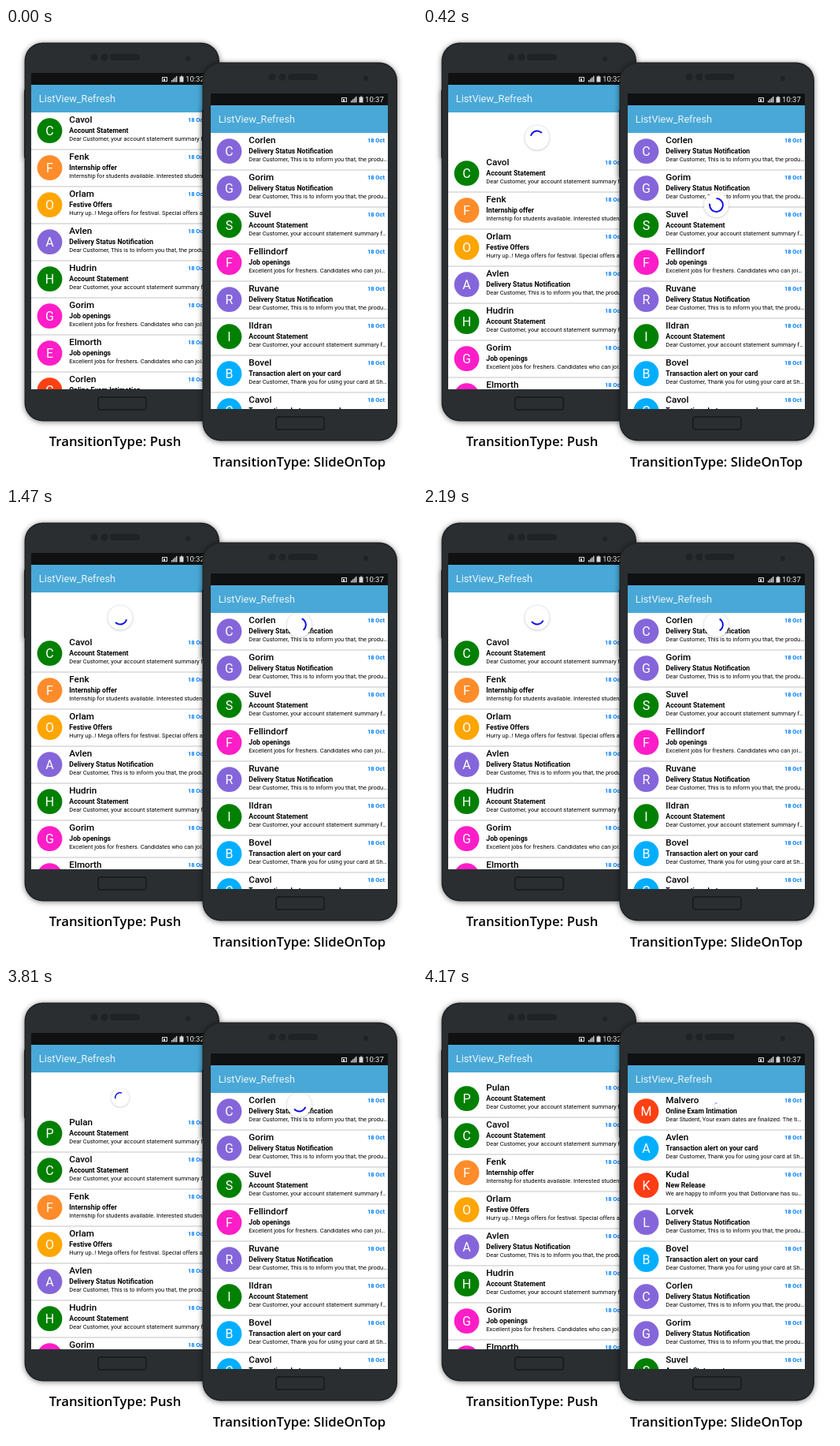
An HTML page with a canvas for the animation above (4200 ms loop, 522x573 px).

```html
<!DOCTYPE html>
<html lang="en">
<head>
<meta charset="utf-8">
<title>Pull to refresh transitions</title>
<style>
html, body { margin: 0; width: 100%; height: 100%; overflow: hidden; background: #fff; }
canvas { display: block; width: 522px; height: 573px; }
</style>
</head>
<body>
<canvas id="stage"></canvas>
<script>
const W = 522, H = 573, LOOP = 4200, STEP = 30, ROW = 47;
const canvas = document.getElementById('stage');
const ctx = canvas.getContext('2d');
const dpr = window.devicePixelRatio || 1;
canvas.width = W * dpr;
canvas.height = H * dpr;

// subject, preview, avatar colour
const MAILS = {
  account: ['Account Statement', 'Dear Customer, your account statement summary f…', '#008000'],
  intern: ['Internship offer', 'Internship for students available. Interested studen…', '#ff8c2a'],
  festive: ['Festive Offers', 'Hurry up..! Mega offers for festival. Special offers a…', '#ffa500'],
  delivery: ['Delivery Status Notification', 'Dear Customer, This is to inform you that, the produ…', '#8566da'],
  job: ['Job openings', 'Excellent jobs for freshers. Candidates who can joi…', '#ff1dc8'],
  exam: ['Online Exam Intimation', 'Dear Student, Your exam dates are finalized. The ti…', '#ff4012'],
  card: ['Transaction alert on your card', 'Dear Customer, Thank you for using your card at Sh…', '#00aeff'],
  release: ['New Release', 'We are happy to inform you that Datlorvane has su…', '#ff3c14']
};

const pushList = [
  ['Cavol', 'account'], ['Fenk', 'intern'], ['Orlam', 'festive'], ['Avlen', 'delivery'],
  ['Hudrin', 'account'], ['Gorim', 'job'], ['Elmorth', 'job'], ['Corlen', 'exam']
];
const pushNew = [['Pulan', 'account']];
const slideList = [
  ['Corlen', 'delivery'], ['Gorim', 'delivery'], ['Suvel', 'account'], ['Fellindorf', 'job'],
  ['Ruvane', 'delivery'], ['Ildran', 'account'], ['Bovel', 'card'], ['Cavol', 'card']
];
const slideNew = [
  ['Malvero', 'exam'], ['Avlen', 'card'], ['Kudal', 'release'], ['Lorvek', 'delivery'], ['Bovel', 'card']
];

// [time, value] keys, linear between them
const pushOffset = [[0, 0], [180, 110], [210, 110], [270, 79], [360, 54], [3945, 54], [4221, 0]];
const pushScale = [[3765, 1], [3945, 0]];
const pushSpin = [[360, -136], [750, 65], [2190, 805], [3240, 1385], [3810, 1670], [4200, 1865]];
const slideY = [[0, -18], [30, -16], [270, 49], [510, 117], [600, 117], [690, 50], [750, 20], [810, 15]];
const slideScale = [[4020, 1], [4220, 0]];
const slideSpin = [[810, -704], [2190, 0], [3240, 535], [3810, 800], [4200, 990]];

function at(keys, t) {
  if (t <= keys[0][0]) return keys[0][1];
  for (let i = 1; i < keys.length; i++) {
    const [t0, a] = keys[i - 1], [t1, b] = keys[i];
    if (t <= t1) return a + (b - a) * (t - t0) / (t1 - t0);
  }
  return keys[keys.length - 1][1];
}

function text(str, x, y, font, color, align = 'left') {
  ctx.font = font;
  ctx.fillStyle = color;
  ctx.textAlign = align;
  ctx.fillText(str, x, y);
}

const roboto = (size, weight = 400) => `${weight} ${size}px Roboto, sans-serif`;

function rect(x, y, w, h, color) {
  ctx.fillStyle = color;
  ctx.fillRect(x, y, w, h);
}

function pill(x, y, w, h, r, color) {
  ctx.beginPath();
  ctx.roundRect(x, y, w, h, r);
  ctx.fillStyle = color;
  ctx.fill();
}

function disc(x, y, r, color) {
  ctx.beginPath();
  ctx.arc(x, y, r, 0, Math.PI * 2);
  ctx.fillStyle = color;
  ctx.fill();
}

function shadow(color, blur, dy) {
  ctx.shadowColor = color;
  ctx.shadowBlur = blur * dpr;
  ctx.shadowOffsetY = dy * dpr;
}

function body(x, y) {
  ctx.save();
  shadow('rgba(0,0,0,.5)', 7, 1);
  pill(x - 1, y + 59, 4, 87, 1.5, '#212527');
  pill(x - 0.5, y - 0.5, 247.5, 480, 23, '#202426');
  ctx.restore();
  pill(x + 1, y + 1, 244.5, 477, 22, '#2a2e30');
  disc(x + 88, y + 18, 4.5, '#202325');
  disc(x + 101, y + 18, 4.5, '#202325');
  pill(x + 108, y + 14, 38, 8, 4, '#202325');
  disc(x + 207, y + 20, 3, '#202325');
  ctx.beginPath();
  ctx.roundRect(x + 93, y + 449, 61, 16, 3);
  ctx.strokeStyle = '#17191a';
  ctx.lineWidth = 1.5;
  ctx.stroke();
}

function statusBar(x, y, clock) {
  rect(x, y, 225, 15, '#101112');
  const ink = '#d8d8d8';
  ctx.strokeStyle = ink;
  ctx.lineWidth = 1;
  ctx.strokeRect(x + 166.5, y + 5.5, 6, 5);
  rect(x + 168, y + 7, 2, 3, ink);
  for (let i = 0; i < 4; i++) rect(x + 178 + i * 2, y + 9 - i * 1.7, 1.4, 2.5 + i * 1.7, ink);
  rect(x + 190, y + 3.5, 2, 1, ink);
  rect(x + 188.5, y + 4.5, 5, 7, ink);
  text(clock, x + 196, y + 11, roboto(9.6), '#e8e8e8');
}

function row(x, y, [name, kind]) {
  const [subject, preview, color] = MAILS[kind];
  disc(x + 23.5, y + 23.2, 15.9, color);
  text(name[0], x + 23.5, y + 28.8, roboto(16), '#fff', 'center');
  text(name, x + 48.3, y + 13.4, roboto(11.7, 500), '#000');
  text(subject, x + 48.3, y + 26, roboto(8.7, 700), '#000');
  text(preview, x + 48.3, y + 36.3, roboto(7.5), '#000');
  text('18 Oct', x + 221, y + 12.2, roboto(7.5, 700), '#0080ff', 'right');
  rect(x, y + ROW - 0.5, 225, 1, '#c4c4c4');
}

// sweep and start angle in degrees
function spinner(x, y, scale, start, sweep) {
  if (scale <= 0) return;
  ctx.save();
  ctx.translate(x, y);
  ctx.scale(scale, scale);
  ctx.save();
  shadow('rgba(0,0,0,.28)', 3 * scale, 0.5 * scale);
  disc(0, 0, 15.6, '#fff');
  ctx.restore();
  ctx.beginPath();
  ctx.arc(0, 0, 8.4, start * Math.PI / 180, (start + sweep) * Math.PI / 180);
  ctx.strokeStyle = '#0f0fe6';
  ctx.lineWidth = 2;
  ctx.stroke();
  ctx.restore();
}

function phone(x, y, sx, sy, height, clock, drawList) {
  body(x, y);
  ctx.save();
  ctx.beginPath();
  ctx.rect(sx, sy, 225, height);
  ctx.clip();
  rect(sx, sy, 225, height, '#fff');
  statusBar(sx, sy, clock);
  rect(sx, sy + 15, 225, 35, '#49a8d7');
  text('ListView_Refresh', sx + 9.8, sy + 37, roboto(12.7), '#e9f5fb');
  ctx.beginPath();
  ctx.rect(sx, sy + 50, 225, height - 50);
  ctx.clip();
  drawList(sx, sy + 50);
  ctx.restore();
}

function rows(list, x, y) {
  list.slice(0, 9).forEach((item, i) => row(x, y + i * ROW, item));
}

const ARC = 120;

function pushView(t, x, y) {
  const off = at(pushOffset, t);
  rows(t >= 3720 ? pushNew.concat(pushList) : pushList, x, y + off);
  const cy = y + off - 22 + Math.min(2.5, Math.max(0, (off - 54) / 10));
  if (t < 360) spinner(x + 113, cy, 1, -90, 360 * Math.min(1, t < 180 ? off / 110 : 1));
  else spinner(x + 113, cy, at(pushScale, t), at(pushSpin, t) - ARC / 2, ARC);
}

function slideView(t, x, y) {
  rows(t >= 4020 ? slideNew.concat(slideList) : slideList, x, y);
  const dy = at(slideY, t);
  if (dy <= -16) return;
  const pulled = t > 510 ? 1 : Math.max(0, dy / 117);
  if (t < 810) spinner(x + 112.5, y + dy, 1, -90, 360 * pulled);
  else spinner(x + 112.5, y + dy, at(slideScale, t), at(slideSpin, t) - ARC / 2, ARC);
}

function draw(t) {
  ctx.setTransform(dpr, 0, 0, dpr, 0, 0);
  rect(0, 0, W, H, '#fff');
  phone(24, 19, 32, 57, 401, '10:32', (x, y) => pushView(t, x, y));
  phone(250, 44, 260, 83, 400, '10:37', (x, y) => slideView(t, x, y));
  const caption = '600 16.75px "Open Sans", "Noto Sans", sans-serif';
  text('TransitionType: Push', 138.5, 529.5, caption, '#000', 'center');
  text('TransitionType: SlideOnTop', 372.5, 555.5, caption, '#000', 'center');
}

let begin = null;
function tick(now) {
  if (begin === null) begin = now;
  const t = (now - begin) % LOOP;
  draw(Math.floor(t / STEP) * STEP);
  requestAnimationFrame(tick);
}
draw(0);
requestAnimationFrame(tick);
</script>
</body>
</html>
```
